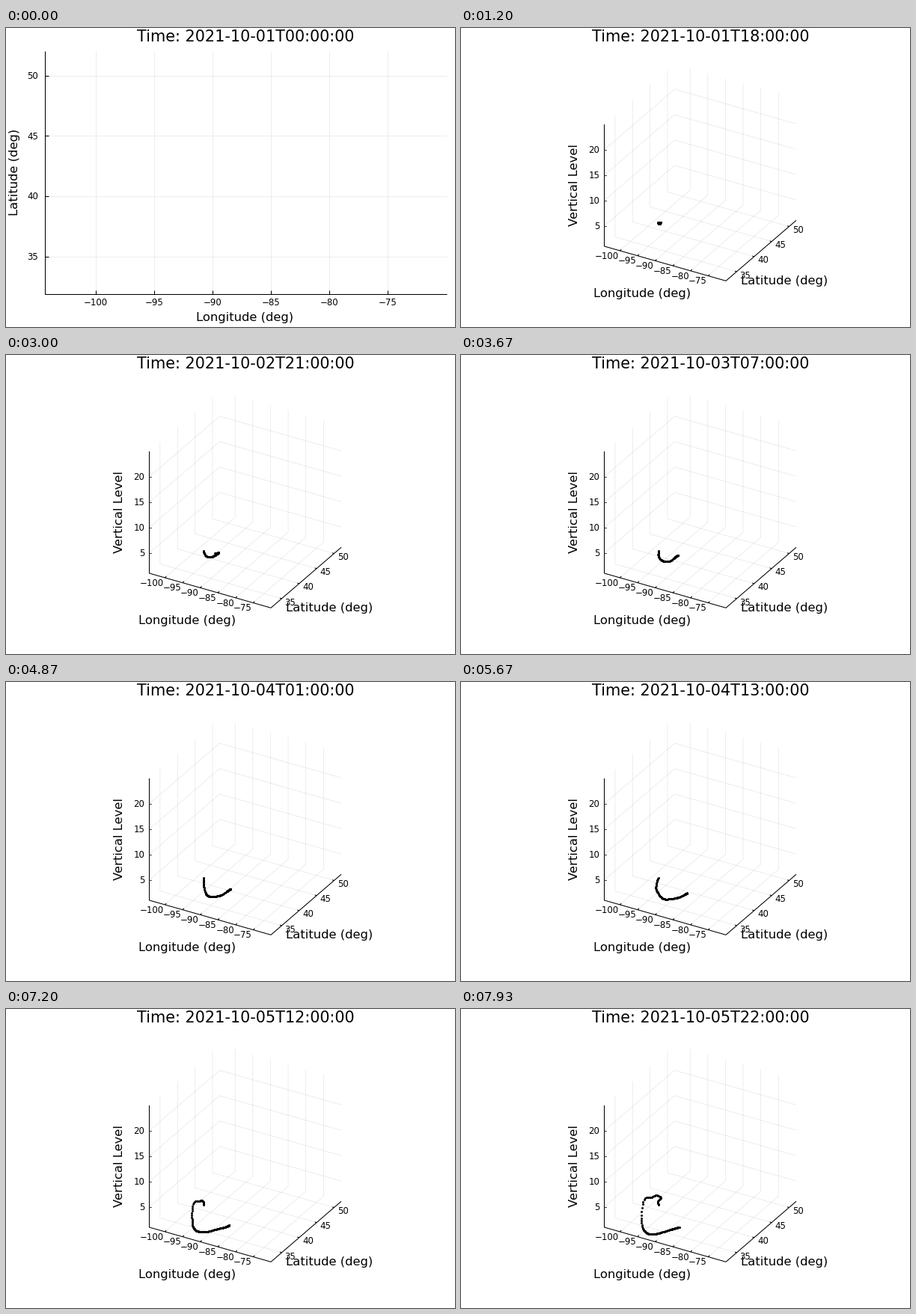
A matplotlib script for the animation above (8000 ms loop, 600x400 px).

```python
import numpy as np
import matplotlib.pyplot as plt
from matplotlib.animation import FuncAnimation

W, H, DPI = 600, 400, 100
HOURS = 120
PX = 72 / DPI                      # points per pixel
TITLE, LABEL, TICK = 20.75, 16.35, 11.8   # font sizes in pixels

plt.rcParams["font.family"] = "DejaVu Sans"
plt.rcParams["axes.unicode_minus"] = True

fig = plt.figure(figsize=(W / DPI, H / DPI), dpi=DPI, facecolor="white")


def layer():
    ax = fig.add_axes([0, 0, 1, 1])
    ax.set_xlim(0, W)
    ax.set_ylim(H, 0)
    ax.axis("off")
    return ax


def line(ax, *pts, grid=False):
    x, y = zip(*pts)
    style = dict(lw=0.7 * PX, alpha=0.1) if grid else dict(lw=1.05 * PX)
    ax.plot(x, y, color="black", solid_capstyle="butt", **style)


def text(ax, x, y, s, size, ha="center", rot=0):
    return ax.text(x, y, s, fontsize=size * PX, ha=ha, va="baseline",
                   rotation=rot, rotation_mode="anchor", color="black")


def tick_text(ax, x, mid, value, ha="center"):
    s = str(value).replace("-", "\u2212")
    text(ax, x, mid + 4.3, s, TICK, ha)


LONS = range(-100, -74, 5)
LATS = range(35, 51, 5)
LEVELS = range(5, 21, 5)


def draw_flat(ax):
    left, right, top, bottom = 51.5, 588.5, 30.5, 355.5
    for lon in LONS:
        x = 120.3 + 15.6 * (lon + 100)
        line(ax, (x, top), (x, bottom), grid=True)
        line(ax, (x, bottom), (x, bottom - 5))
        tick_text(ax, x - 0.5, 367, lon)
    for lat in LATS:
        y = 63.5 + 16.15 * (50 - lat)
        line(ax, (left, y), (right, y), grid=True)
        line(ax, (left, y), (left + 5, y))
        tick_text(ax, 43.3, y, lat, "right")
    line(ax, (left, top), (left, bottom), (right, bottom))
    text(ax, 319.5, 392.3, "Longitude (deg)", LABEL)
    text(ax, 16, 193, "Latitude (deg)", LABEL, rot=90)


def cube(lon, lat, lev):
    """Project unit-box coordinates to pixels."""
    return (191.5 + 162.5 * lon + 94 * lat,
            292 + 46.3 * lon - 81 * lat - 163 * lev)


def draw_cube(ax):
    for lon in LONS:
        u = (lon + 104.39) / 34.42
        line(ax, cube(u, 0, 0), cube(u, 1, 0), cube(u, 1, 1), grid=True)
        line(ax, cube(u, 0, 0), cube(u, 0.022, 0))
        x, y = cube(u, 0, 0)
        tick_text(ax, x - 1.7, y + 6.4, lon, "right")
    for lat in LATS:
        v = (lat - 31.92) / 20.12
        line(ax, cube(1, v, 0), cube(0, v, 0), cube(0, v, 1), grid=True)
        line(ax, cube(1, v, 0), cube(0.985, v, 0))
        x, y = cube(1, v, 0)
        tick_text(ax, x + 4.2, y + 4.4, lat, "left")
    for lev in LEVELS:
        w = (lev - 1) / 24
        line(ax, cube(0, 0, w), cube(0, 1, w), cube(1, 1, w), grid=True)
        x, y = cube(0, 0, w)
        line(ax, (x, y), (x + 2.2, y))
        tick_text(ax, 185.3, y - 0.3, lev, "right")
    line(ax, cube(0, 0, 1), cube(0, 0, 0), cube(1, 0, 0), cube(1, 1, 0))
    text(ax, 241.7, 360, "Longitude (deg)", LABEL)
    text(ax, 431.7, 343, "Latitude (deg)", LABEL)
    text(ax, 156.5, 210, "Vertical Level", LABEL, rot=90)


# Plume shape at a few hours: (release hour, x, y); the newest is at SOURCE.
SOURCE = (264, 262)
PLUME = {
    18: [(0, 265.5, 262), (6, 266.5, 260), (12, 263.5, 260)],
    34: [(0, 273, 259.8), (6, 277, 260), (12, 275, 263), (18, 271, 264.8),
         (25, 266, 264.3)],
    55: [(0, 285, 270.5), (8, 290, 268), (16, 285, 271.5), (25, 279, 275.7),
         (35, 271, 276), (49, 263.5, 268)],
    73: [(0, 295, 280), (8, 299.5, 277), (24, 294, 281), (27, 291, 283),
         (42, 278, 286.8), (51, 270, 286), (57, 267, 283), (66, 264, 271)],
    97: [(0, 305, 286.5), (12, 303, 288.7), (40, 287, 292.7),
         (44, 282.5, 293.7), (58, 270, 295.5), (66, 262, 293.7),
         (74, 256.5, 289), (84, 256.5, 274), (91, 257.7, 263.5),
         (94, 260, 261.7)],
    119: [(0, 291, 292), (14, 287, 293), (38, 272, 297.5), (42, 267.5, 299),
          (60, 255, 301), (73, 246.5, 299), (82, 241, 289.5),
          (85, 240.2, 280), (90, 242.8, 257.5), (92, 245.5, 252.5),
          (96, 253, 251.8), (101, 260, 248.5), (107, 267.3, 251),
          (114, 262.5, 257.5)],
}


def spline(k, p, q):
    """Cubic Hermite curve through p at knots k, sampled at q."""
    m = np.gradient(p, k)
    i = np.clip(np.searchsorted(k, q, side="right") - 1, 0, len(k) - 2)
    h = k[i + 1] - k[i]
    t = (q - k[i]) / h
    return ((1 + 2 * t) * (1 - t) ** 2 * p[i] + t * (1 - t) ** 2 * h * m[i]
            + t * t * (3 - 2 * t) * p[i + 1] + t * t * (t - 1) * h * m[i + 1])


def build_paths():
    """Position of every particle at its release and at each later key hour."""
    shapes = {}
    for hour, pts in PLUME.items():
        k, x, y = np.array(pts + [(hour, *SOURCE)], float).T
        ids = np.arange(hour + 1)
        shapes[hour] = np.column_stack([spline(k, x, ids), spline(k, y, ids)])
    paths = []
    for n in range(HOURS):
        later = [hour for hour in shapes if hour > n]
        times = [n] + later
        spots = np.array([SOURCE] + [shapes[hour][n] for hour in later])
        paths.append((times, spots))
    return paths


PATHS = build_paths()


def plume_at(hour):
    return np.array([(np.interp(hour, t, p[:, 0]), np.interp(hour, t, p[:, 1]))
                     for t, p in PATHS[:hour + 1]])


flat, box, top = layer(), layer(), layer()
draw_flat(flat)
draw_cube(box)
dots, = box.plot([], [], "o", color="black", ms=3 * PX, mew=0)
dots.set_snap(False)
title = text(top, 320, 18, "", TITLE)


def update(hour):
    flat.set_visible(hour == 0)
    box.set_visible(hour > 0)
    pts = plume_at(hour)
    dots.set_data(pts[:, 0], pts[:, 1])
    title.set_text(f"Time: 2021-10-{1 + hour // 24:02d}T{hour % 24:02d}:00:00")
    return dots, title


anim = FuncAnimation(fig, update, frames=HOURS, interval=8000 / HOURS,
                     repeat=True, repeat_delay=0, blit=False)
plt.show()
```
